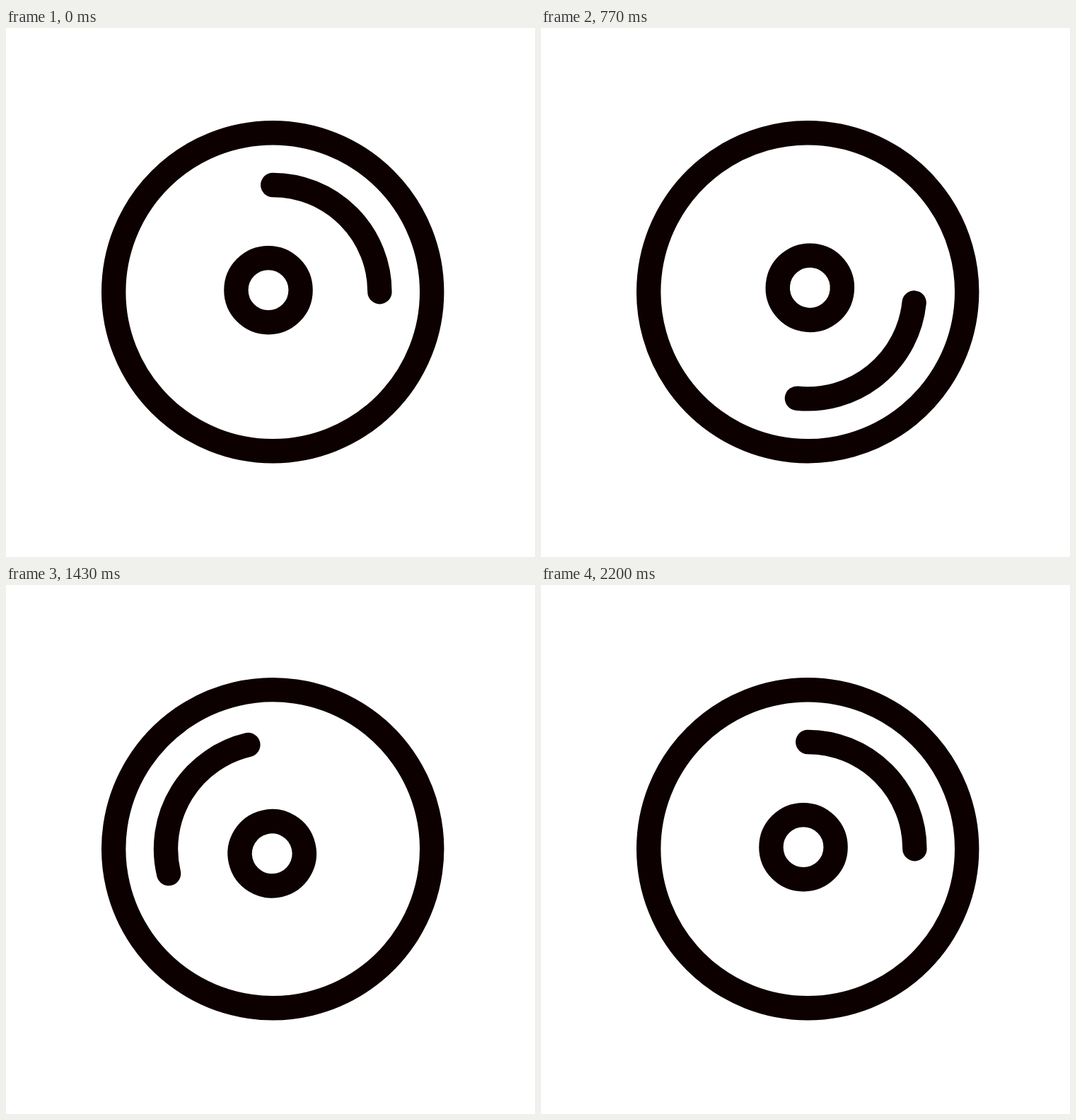
An HTML page for the animation above (2330 ms loop, 748x748 px).

```html
<!DOCTYPE html>
<html lang="en">
<head>
<meta charset="utf-8">
<title>Spinning disc</title>
<style>
  html, body { margin: 0; height: 100%; overflow: hidden; background: #fff; }
  svg { display: block; width: 100%; height: 100%; }
</style>
</head>
<body>
<svg viewBox="0 0 748 748">
  <g id="disc" fill="none" stroke="#0d0000" stroke-width="34.4" stroke-linecap="round">
    <circle cx="377.2" cy="373.2" r="225"/>
    <circle cx="371" cy="370.7" r="45.6"/>
    <path d="M377.2 222a151.2 151.2 0 0 1 151.2 151.2"/>
  </g>
</svg>
<script>
  const LOOP = 2330, FPS = 30, STEPS = 65;
  const disc = document.getElementById('disc');
  const ease = u => u * u * (3 - 2 * u);
  const start = performance.now();

  function draw(now) {
    const t = Math.max(0, now - start) % LOOP;
    // Times snap to 10 ms; the turn begins one step into the loop.
    const tick = Math.floor((Math.floor(t / 10) * 10 + 5) * FPS / 1000);
    const u = Math.min(1, Math.max(0, (tick - 1) / STEPS));
    disc.setAttribute('transform', `rotate(${360 * ease(u)} 377.2 373.2)`);
    requestAnimationFrame(draw);
  }
  draw(start);
</script>
</body>
</html>
```
